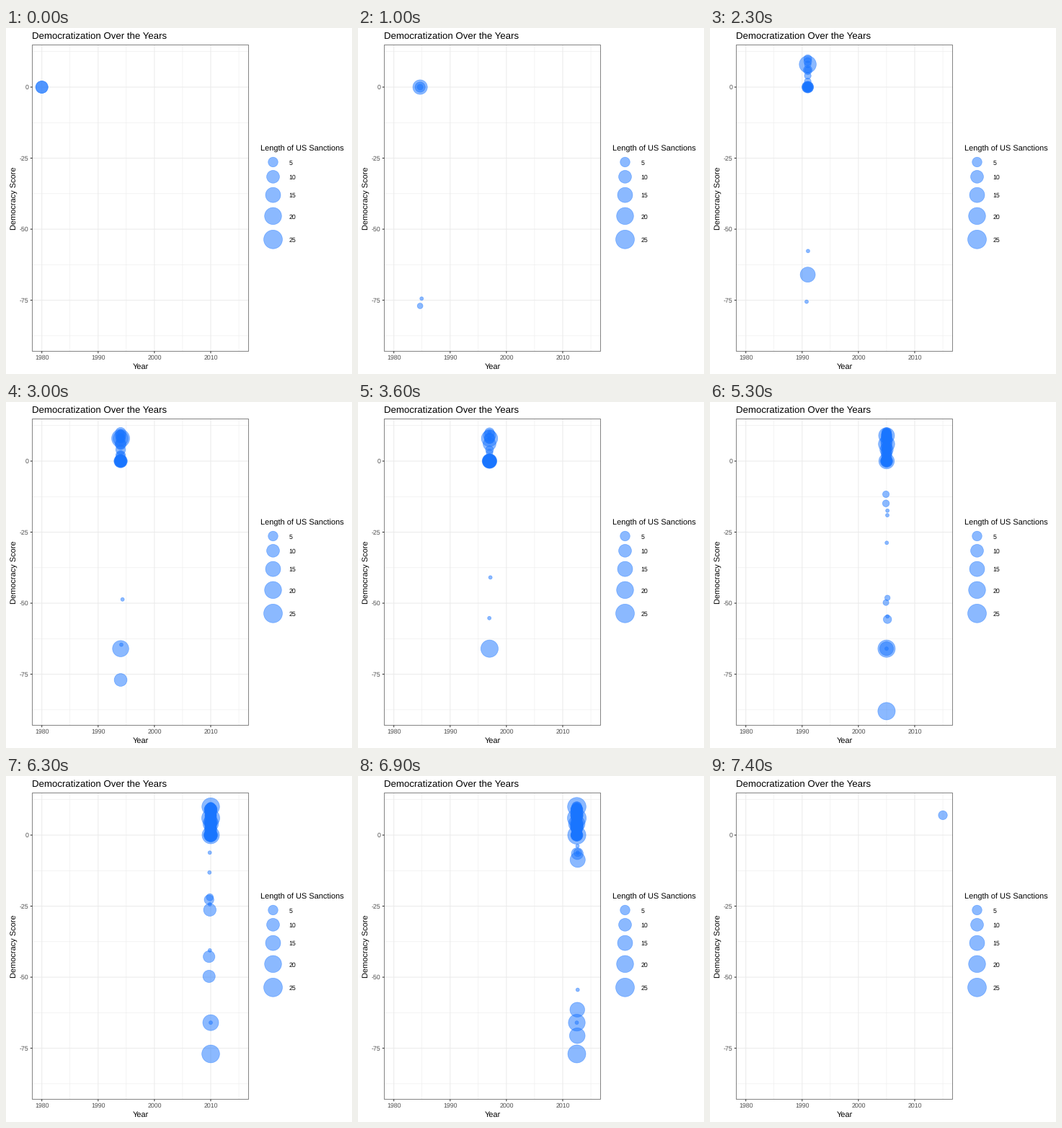
Animation of 480 by 480 pixels, one loop 7.5 s. Source, as a matplotlib script:

```python
import random

import matplotlib.pyplot as plt
import numpy as np
from matplotlib.animation import FuncAnimation
from matplotlib.patches import Rectangle

FRAMES, FIRST, LAST = 75, 1980, 2015
END = FRAMES - 1
PT = 0.72  # points per pixel at 100 dpi
BLUE, GRID, DARK, GREY = "#1975ff", "#ebebeb", "#333333", "#4d4d4d"
LEFT, TOP, RIGHT, BOTTOM = 36.5, 23.5, 336.5, 448.5

plt.rcParams.update({"font.family": "Liberation Sans", "text.hinting": "no_hinting"})


def px(year):
    return 49.7 + 7.81 * (year - FIRST)


def py(score):
    return 82 - 3.942 * score


def radius(length):
    share = np.clip((np.asarray(length, float) - 1) / 25, 0, 1)
    return 0.375 * (2.845 * (2 + 10 * np.sqrt(share)) + 0.94)


def key_frame(year):
    return round((year - FIRST) * END / (LAST - FIRST))


def track(keys, last=None):
    """Linear path through (year, score, length) keys."""
    year, score, length = np.array(keys, float).T
    at = [key_frame(y) for y in year]
    return at, px(year), py(score), radius(length), last or at[-1]


def hold(start, end, score, length=1, grow=1):
    return [(y, score, length + grow * (y - start)) for y in range(start, end + 1)]


def run(start, score, goal, length=1, last=END - 1):
    """Steady change of score up to the final year."""
    return track([(start, score, 1), (LAST, goal, length)], last)


def crowd(count):
    """Short cases between 0 and 10, more of them in later years."""
    rng = random.Random(12)
    for _ in range(count):
        start = 1991 + int(22 * rng.random() ** 0.6)
        late = start > 1998
        score = max(0, rng.randint(-3, 10))
        if not late and 4 <= score <= 6:
            score = 8
        top = 5 if score == 10 or (not late and 0 < score < 7) else 11
        yield hold(start, min(start + rng.randint(3, top), LAST - 1), score)


def build_tracks():
    # Climbs out of the special codes; one alone outlives the final year.
    runs = [run(2000, -77, 7, 4, last=END), run(1984, -77, 8), run(1987, -88, 4),
            run(2000, -88, 9), run(2000, -88, 6, 21), run(2002, -66, 7, 12)]
    # Falls towards -66, -77 and -88.
    runs += [run(2000 + 2 * min(k, 1), 8 - k, -66 - 11 * k, min(1 + 20 * k, 24))
             for k in range(3)]

    cases = [
        # changes of score on the way
        hold(1980, 1986, 0, 9) + hold(1987, 1988, 1, 16) + hold(1989, 1995, 8, 18),
        hold(1998, 2005, -88, 17, 0.6) + hold(2006, 2014, -77, 21.5, 0.2),
        hold(1989, 2005, 9) + hold(2006, 2014, 10, 18),
        # early cases
        hold(1980, 1982, 0, 9),
        hold(1981, 1988, 0, 2),
        hold(1984, 1986, -77),
        hold(1992, 1994, -77, 8),
        # the -66 group
        hold(1990, 2001, -66, 14),
        hold(1998, 2006, -66, 14),
        hold(2002, 2014, -66, 9),
        hold(2005, 2014, -66, grow=0),
        # long cases
        hold(1988, 2013, 6),
        hold(1990, 2014, 0),
        hold(1995, 2014, 4),
        hold(1993, 2003, 8, 14),
    ]
    cases += [hold(y, y + 13, 0) for y in range(1984, 1991)]
    cases += [hold(1990, 1994, score) for score in range(2, 9, 2)]
    cases += [hold(1989 + 4 * k, 1994 + 5 * k, 10) for k in range(4)]
    cases += crowd(125)
    return runs + [track(case) for case in cases]


fig = plt.figure(figsize=(4.8, 4.8), dpi=100, facecolor="white")
ax = fig.add_axes([0, 0, 1, 1])
ax.set(xlim=(0, 480), ylim=(480, 0))
ax.axis("off")


def line(xs, ys, color, width):
    ax.plot(xs, ys, color=color, lw=width * PT, zorder=1,
            solid_capstyle="butt", snap=False)


def label(x, y, text, size, color="black", **kw):
    ax.text(x, y, text, fontsize=size * PT, color=color, **kw)


def bubbles(x, y, r):
    dots = ax.scatter(x, y, s=(2 * PT * np.asarray(r)) ** 2, color=BLUE,
                      alpha=0.5, zorder=3)
    dots.set_linewidth([0.7 * PT] * 2)  # a list keeps lone dots off the pixel grid
    return dots


def draw_panel():
    for x in px(np.arange(1985, 2016, 10)):
        line([x, x], [TOP, BOTTOM], GRID, 0.55)
    for y in py(np.arange(-87.5, 13, 25)):
        line([LEFT, RIGHT], [y, y], GRID, 0.55)
    for year in range(1980, 2011, 10):
        x = px(year)
        line([x, x], [TOP, BOTTOM], GRID, 1.07)
        line([x, x], [BOTTOM, BOTTOM + 2.75], DARK, 1.07)
        label(x, 460, str(year), 8.8, GREY, ha="center")
    for score in range(-75, 1, 25):
        y = py(score)
        line([LEFT, RIGHT], [y, y], GRID, 1.07)
        line([LEFT - 2.75, LEFT], [y, y], DARK, 1.07)
        label(31.2, y + 3.2, str(score), 8.8, GREY, ha="right")
    ax.add_patch(Rectangle((LEFT, TOP), RIGHT - LEFT, BOTTOM - TOP, fill=False,
                           ec=DARK, lw=0.6 * PT, zorder=4, snap=False))
    label(36, 15, "Democratization Over the Years", 13.2)
    label(186.4, 473, "Year", 11, ha="center")
    label(13.3, 236, "Democracy Score", 11, rotation=90, ha="center",
          va="baseline", rotation_mode="anchor")


def draw_legend():
    label(353, 171, "Length of US Sanctions", 11)
    lengths = np.arange(5, 26, 5)
    r = radius(lengths)
    heights = r / 0.375 - 0.5
    ys = 186 + np.cumsum(heights) - heights / 2 - heights[0] / 2
    bubbles(np.full(len(r), 370.5), ys, r)
    for n, y in zip(lengths, ys):
        label(392.6, y + 3.7, str(n), 8.8)


draw_panel()
draw_legend()
TRACKS = build_tracks()
points = bubbles([], [], [])


def draw(i):
    spots = np.array([[np.interp(i, at, v) for v in (x, y, r)]
                      for at, x, y, r, last in TRACKS if at[0] <= i <= last])
    points.set_offsets(spots[:, :2])
    points.set_sizes((2 * PT * spots[:, 2]) ** 2)
    return [points]


anim = FuncAnimation(fig, draw, frames=FRAMES, interval=100, repeat=True,
                     repeat_delay=0, blit=False)
plt.show()
```
